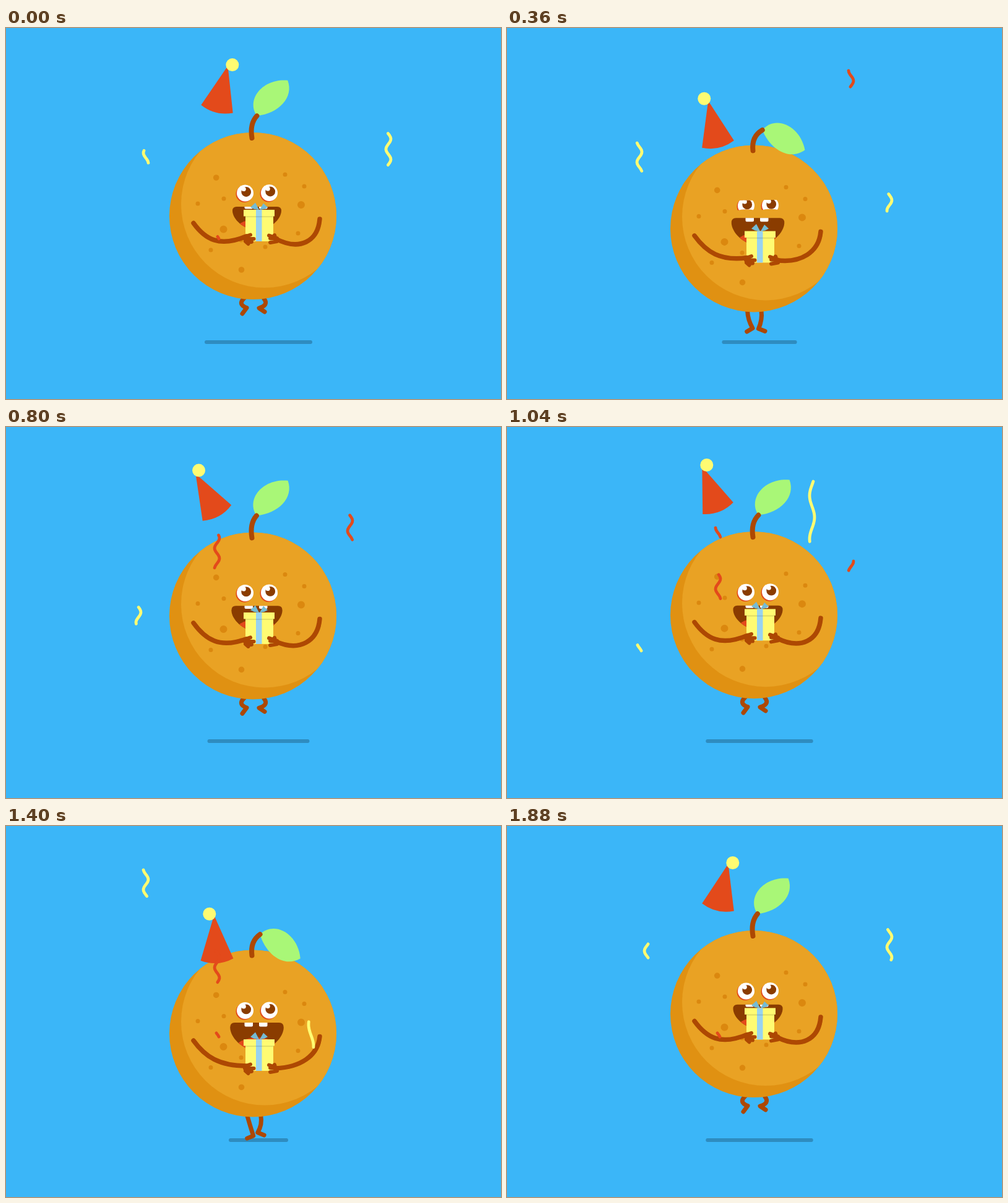
These frames come from a looping animation (800 by 600 pixels, 1.92 s). An HTML page:

```html
<!DOCTYPE html>
<html lang="en">
<head>
<meta charset="utf-8">
<title>Birthday orange</title>
<style>
  html, body { margin: 0; width: 100%; height: 100%; overflow: hidden; background: #3bb6f8; }
  svg { display: block; width: 100vw; height: 100vh; }
  .limb { fill: none; stroke: #ad4803; stroke-linecap: round; stroke-linejoin: round; }
  .strand { fill: none; stroke-width: 4.8; stroke-linecap: round; stroke-linejoin: round; }
  .spots { fill: none; stroke: #db880f; stroke-linecap: round; }
</style>
</head>
<body>
<svg viewBox="0 0 800 600">
  <defs>
    <clipPath id="bodyClip"><circle cx="399" cy="304" r="135"/></clipPath>
    <clipPath id="mouthClip"><path id="mouthShape" d="M-36 0H36Q43.5 0 43.5 8C43.5 24 24 46 0 46S-43.5 24-43.5 8Q-43.5 0-36 0Z"/></clipPath>
    <clipPath id="lids"><path id="lidPath"/></clipPath>
    <g id="eye" clip-path="url(#lids)">
      <circle cx="-1.5" cy="1.5" r="13.5" fill="#e34a1b"/>
      <circle r="13.5" fill="#fff"/>
      <circle cx="1.7" cy="-2" r="7.9" fill="#8a3c00"/>
      <circle cx="-2.3" cy="-6.5" r="3.6" fill="#fff"/>
    </g>
  </defs>

  <rect width="800" height="600" fill="#3bb6f8"/>
  <rect id="shadow" y="505" height="6" rx="3" fill="#2e8cc0"/>
  <path id="legL" class="limb" stroke-width="7"/>
  <path id="legR" class="limb" stroke-width="7"/>

  <g id="body">
    <circle cx="399" cy="304" r="135" fill="#e09112"/>
    <circle cx="418" cy="285" r="135" fill="#e9a224" clip-path="url(#bodyClip)"/>
    <g class="spots">
      <path stroke-width="7" d="M451 237h0M482 256h0M352 276h0M310 284h0M331 359h0M472 332h0M419 354h0M380 343h0"/>
      <path stroke-width="9.6" d="M339.700 242h0M380.500 391h0"/>
      <path stroke-width="12" d="M477 286h0M351.500 325.500h0"/>
    </g>
    <path id="leaf" d="M0 0C8-31 52-33 76 0C62 26 26 24 0 0Z" fill="#a9f777"/>
    <path id="stem" class="limb" stroke-width="8"/>
    <use href="#eye" x="386.5" y="267"/>
    <use href="#eye" x="425.5" y="266.5"/>
    <g id="mouth">
      <use href="#mouthShape" fill="#8a3c00"/>
      <ellipse cy="41" rx="34" ry="16" fill="#e34a1b" clip-path="url(#mouthClip)"/>
    </g>
    <path id="teeth" fill="#fff"/>
  </g>

  <path id="hat" d="M-26.5 0Q0 12 26.5 0L0-72Z" fill="#e34a1b"/>
  <circle id="pom" r="10.5" fill="#fffb72"/>

  <g id="gift">
    <path d="M409 294L403 282.500L395 290L401 293ZM410 294L416 283.500L423 290L417 293Z" fill="#74bbd4"/>
    <rect x="387" y="304" width="45" height="41" fill="#fffb72"/>
    <rect x="384" y="294" width="50" height="10.500" fill="#fffb72"/>
    <rect x="404" y="294" width="9.500" height="51" fill="#98d3f0"/>
    <rect x="387" y="304.300" width="45" height="1.800" fill="#000" opacity=".12"/>
  </g>
  <path id="armL" class="limb" stroke-width="7.500"/>
  <path id="armR" class="limb" stroke-width="7.500"/>
  <g id="hands" class="limb" stroke-width="6">
    <path d="M385 338L395 334.500M386 341H400.500M388 345L397 346M387 345L391.500 349"/>
    <path d="M438 340L425 335.500M438 341L427 340M438 345L427 347M434 335L437 345"/>
  </g>
  <g id="confetti"></g>
</svg>
<script>
const { PI, sin, cos, exp, abs, min, max, floor, ceil } = Math;
const $ = id => document.getElementById(id);
const set = (id, attrs) => { for (const k in attrs) $(id).setAttribute(k, attrs[k]); };
const clamp = v => min(1, max(0, v));
const rad = deg => deg * PI / 180;
const ease = u => (1 - cos(PI * clamp(u))) / 2;
// 1 at mid, falling to 0 on both sides
const bump = (t, mid, width, power = 2) => exp(-((abs(t - mid) / width) ** power));

// 32 ticks of 60 ms: two hops of 16 ticks, lowest point at LAND
const TICK = 60, TICKS = 32, HOP = 16, LAND = 7.8;
const YELLOW = '#fffb72', RED = '#e34a1b';

// Confetti strands fall along a wave; head and tail ends move on their own
const LAP = 31.4;
function strand(x, top, start, color, { len = 178, wave = 33, span = 14.3, swing = -4 } = {}) {
  const el = document.createElementNS('http://www.w3.org/2000/svg', 'path');
  el.setAttribute('class', 'strand');
  el.setAttribute('stroke', color);
  $('confetti').append(el);
  return tick => {
    const u = ((tick - start + LAP) % LAP) / span;
    const head = clamp(u), tail = ease((u - .2) / .98);
    const size = (head - tail) * len, n = ceil(size / 3);
    const points = [];
    if (size > .05) for (let i = 0; i <= n; i++) {
      const y = tail * len + size * i / n;
      points.push(`${x + swing * cos(2 * PI * y / wave)} ${top + y}`);
    }
    el.setAttribute('d', points.length ? 'M' + points.join('L') : '');
  };
}
const strands = [
  strand(226, 70, 19.5, YELLOW),
  strand(214, 184, 2.2, YELLOW),
  strand(618, 163, 26.7, YELLOW),
  strand(556, 69, 3.9, RED),
  strand(341, 163, 7.8, RED),
  strand(341, 163, 15.8, RED),
  strand(493, 76, 13.2, YELLOW, { len: 345, wave: 70, span: 12, swing: 4 })
];

// Leg poses: hip, bend, knee, toe
const LEFT = { tucked: [385, 437, 374, 447, 389, 452.5, 382, 462], straight: [390, 437, 395, 453, 400, 470, 390, 474] };
const RIGHT = { tucked: [417, 438, 425, 448, 409, 453, 418, 459], straight: [411, 437, 413, 451, 406.5, 466, 417, 470] };
function drawLeg(id, { tucked, straight }, reach, dy) {
  const v = tucked.map((a, i) => a + (straight[i] - a) * reach + (i % 2) * dy);
  set(id, { d: `M${v[0]} ${v[1]}Q${v[2]} ${v[3]} ${v[4]} ${v[5]}L${v[6]} ${v[7]}` });
}

function drawLegs(p, dy) {
  drawLeg('legL', LEFT, bump(p, 7.8, 2.6, 3), dy);
  drawLeg('legR', RIGHT, bump(p, 5.7, 2.5, 3), dy);
}

function drawLeaf(p) {
  const lean = rad(11.5 + 14.5 * bump(p, 5, 3));
  const x = 36.7 * sin(lean), y = -36.7 * cos(lean);
  const turn = -49 + 80 * bump(p, 7.2, 3.25, 2.6);
  set('stem', { d: `M397.500 178q${x * .15 - 5} -23 ${x} ${y}` });
  set('leaf', { transform: `translate(${397.5 + x} ${178 + y}) rotate(${turn})` });
}

function drawFace(tick, d) {
  const top = 289 - .37 * d, th = 3.5 + .43 * d;
  const tooth = x => `M${x} 0h13.500v${th - 2}q0 2-2 2h-9.500q-2 0-2-2Z`;
  set('mouth', { transform: `translate(405.500 ${top}) scale(${.908 + .0125 * d} ${.82 + .0225 * d})` });
  set('teeth', { d: tooth(385.5) + tooth(409), transform: `translate(0 ${top})` });

  const open = 1 - .8 * bump(tick, 5, 1.3), side = 18 * open - 2;
  set('lidPath', { d: `M-16 ${-16 * open}H16V${side}Q0 ${30 * open - 13} -16 ${side}Z` });
}

// The hat tips back fast and rights itself slowly; the pompom wags once per hop
function drawHat(tick, y) {
  const x = 341, t = (tick - 1.5 + TICKS) % TICKS;
  const tilt = 14.5 - 45.5 * (t < 8 ? ease(t / 8) : 1 - ease((t - 8) / 24));
  const wag = rad(72 * cos(2 * PI * (tick + .3) / HOP)), a = rad(tilt);
  set('hat', { transform: `translate(${x} ${y}) rotate(${tilt})` });
  set('pom', { cx: x + 71 * sin(a) + 8 * sin(wag), cy: y - 71 * cos(a) - 8 * cos(wag) });
}

function drawArms(bodyY, giftY, drop) {
  const sl = 315.5 + bodyY, sr = 309 + bodyY, hl = 337 + giftY, hr = 341 + giftY;
  set('armL', { d: `M303 ${sl}C322 ${sl + 26.5} 345 ${hl + 18 - 18 * drop} 388 ${hl}` });
  set('armR', { d: `M507 ${sr}C504 ${sr + 36 - 4 * drop} 475 ${hr + 20 - 22 * drop} 436 ${hr}` });
}

function draw(ms) {
  const tick = floor(ms / TICK) % TICKS, p = tick % HOP;
  const falling = p < LAND;
  const fall = falling ? p / LAND : (HOP - p) / (HOP - LAND);
  const fromTop = min(p, HOP - p);
  const drop = min(1, (fromTop / 7) ** 2.54);
  const bodyY = 42.7 * fall ** (falling ? 2.82 : 3.39);
  const giftY = 51 * drop, width = 174 - 78 * drop;

  set('shadow', { x: 408 - width / 2, width });
  set('body', { transform: `translate(0 ${bodyY})` });
  for (const id of ['gift', 'hands']) set(id, { transform: `translate(0 ${giftY})` });
  drawLegs(p, bodyY);
  drawLeaf(p);
  drawFace(tick, fromTop);
  drawHat(tick, min(131 + 114 * fall ** 2.65, 184.5 + bodyY));
  drawArms(bodyY, giftY, drop);
  strands.forEach(update => update(tick));
}

const begin = performance.now();
function loop() {
  draw(performance.now() - begin);
  requestAnimationFrame(loop);
}
loop();
</script>
</body>
</html>
```
